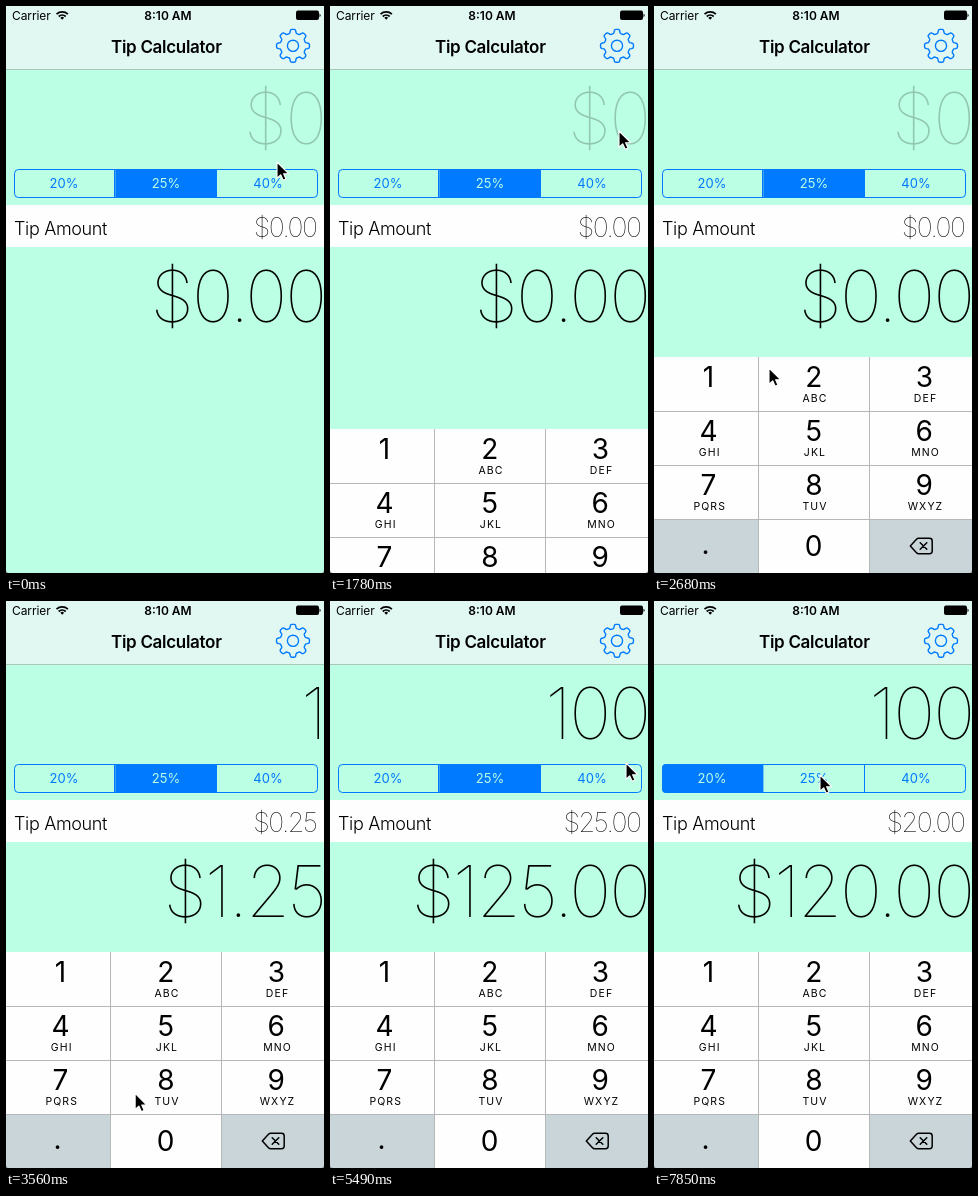
An HTML page that plays this animation: 318x567 px, repeating every 7990 ms.

```html
<!DOCTYPE html>
<html lang="en">
<head>
<meta charset="utf-8">
<title>Tip Calculator</title>
<style>
  html, body { margin: 0; width: 100%; height: 100%; overflow: hidden; background: #bbffe4; }
  svg { display: block; width: 100%; height: 100%; }
  text { font-family: Inter, Roboto, sans-serif; }
  .mid { text-anchor: middle; }
  .end { text-anchor: end; }
  .big { font-size: 71px; font-weight: 100; letter-spacing: -2.1px; }
  .line { fill: none; stroke: #007aff; }
  .seg { font-size: 13px; }
  .digit { font-size: 28px; }
  .letters { font-size: 10.5px; letter-spacing: 1.1px; }
</style>
</head>
<body>
<svg viewBox="0 0 318 567">
  <clipPath id="segmentClip"><rect x="8" y="163" width="304" height="29" rx="4"/></clipPath>

  <rect width="318" height="567" fill="#bbffe4"/>
  <rect width="318" height="63" fill="#e1f8f2"/>
  <rect y="63" width="318" height="1" fill="#a9c5bc"/>

  <text x="6" y="13.5" font-size="12" letter-spacing="-.1">Carrier</text>
  <g fill="none" stroke="#000" stroke-width="1.7">
    <path d="M50.5 8.2a8.4 8.4 0 0 1 11.4 0M52.7 10.5a5.2 5.2 0 0 1 7 0"/>
    <path d="M54.3 11.7a2.8 2.8 0 0 1 3.8 0L56.2 13.8Z" fill="#000" stroke="none"/>
  </g>
  <text class="mid" x="162" y="13.5" font-size="12" font-weight="600">8:10 AM</text>
  <rect x="290" y="4.5" width="23" height="9.5" rx="2"/>
  <path d="M313.5 7.4q2.4 1.9 0 3.8Z"/>

  <text class="mid" x="160.3" y="47.2" font-size="17" font-weight="600" letter-spacing="-.3">Tip Calculator</text>
  <path id="gear" class="line" stroke-width="1.4" stroke-linejoin="round"/>
  <circle class="line" cx="287" cy="39.8" r="5.6" stroke-width="1.4"/>

  <text id="bill" class="big end" x="319" y="138"/>

  <g id="segments" clip-path="url(#segmentClip)"></g>
  <path class="line" d="M108.5 163v29M210.5 163v29"/>
  <rect class="line" x="8.5" y="163.5" width="303" height="28" rx="4"/>
  <g id="segmentLabels"></g>

  <rect y="199" width="318" height="42" fill="#fefefe"/>
  <text x="8" y="228.5" font-size="18" font-weight="300" letter-spacing="-.35">Tip Amount</text>
  <text id="tip" class="end" x="310.5" y="231" font-size="27" font-weight="100" letter-spacing="-1.5"/>
  <text id="total" class="big end" x="319" y="315.5"/>

  <g id="keyboard">
    <rect y="351" width="318" height="216" fill="#fefefe"/>
    <path d="M0 513h104v54H0zM216 513h102v54H216z" fill="#cad5da"/>
    <rect id="pressed" x="105" y="513" width="110" height="54" fill="#cad5da"/>
    <path d="M104.5 351v216M215.5 351v216M0 405.5h318M0 459.5h318M0 513.5h318" stroke="#b4b8ba" fill="none"/>
    <g id="keys"></g>
    <g fill="none" stroke="#000" stroke-width="1.5" stroke-linejoin="round" stroke-linecap="round">
      <path d="M256.3 540l6.2-6.8q.9-1 2.2-1h10.8q2.7 0 2.7 2.7v10.2q0 2.7-2.7 2.7h-10.8q-1.3 0-2.2-1z"/>
      <path d="M266.2 536.7l6.6 6.6M272.8 536.7l-6.6 6.6"/>
    </g>
  </g>

  <path d="M0 564q0 3 3 3H0zM318 564q0 3-3 3h3z" fill="#777"/>
  <path id="cursor" d="M0 0V16.2L3.7 12.8L6.2 18.3L9 17.1L6.6 11.7H11.6Z" stroke="#fff" stroke-width="1.1" stroke-linejoin="round"/>
</svg>
<script>
const LOOP = 7990, FRAMES = 54, FRAME = LOOP / FRAMES;
const MINT = '#bbffe4', BLUE = '#007aff';
const $ = id => document.getElementById(id);

function add(parent, tag, attrs, content = '') {
  const el = document.createElementNS('http://www.w3.org/2000/svg', tag);
  for (const name in attrs) el.setAttribute(name, attrs[name]);
  el.textContent = content;
  return $(parent).appendChild(el);
}

// A circle whose radius follows a flattened cosine, giving rounded teeth.
function gearPath(cx, cy, teeth) {
  const points = Array.from({ length: 160 }, (_, i) => {
    const a = i / 160 * 2 * Math.PI;
    const r = 14.6 + 1.9 * Math.tanh(2.5 * Math.cos(teeth * a));
    return `${cx + r * Math.sin(a)} ${cy - r * Math.cos(a)}`;
  });
  return `M${points.join('L')}Z`;
}
$('gear').setAttribute('d', gearPath(287, 39.8, 8));

const rates = [20, 25, 40];
const segments = rates.map((_, i) =>
  add('segments', 'rect', { x: 8 + 101.3 * i, y: 163, width: 101.4, height: 29, fill: BLUE }));
const labels = rates.map((rate, i) =>
  add('segmentLabels', 'text', { class: 'seg mid', x: 58 + 102 * i, y: 182 }, rate + '%'));

const columns = [54.5, 159.8, 270.3];
['', 'ABC', 'DEF', 'GHI', 'JKL', 'MNO', 'PQRS', 'TUV', 'WXYZ'].forEach((letters, i) => {
  const x = columns[i % 3], y = 381 + 54 * Math.floor(i / 3);
  add('keys', 'text', { class: 'digit mid', x, y }, i + 1);
  add('keys', 'text', { class: 'letters mid', x: x + 1.2, y: y + 15 }, letters);
});
add('keys', 'text', { class: 'digit mid', x: 159.5, y: 550 }, '0');
add('keys', 'text', { class: 'digit mid', x: 51.5, y: 548 }, '.');

const typedAt = [22, 28, 30], pressAt = 27, switchAt = 45;

// Places the pointer visits: arrival, departure, x, y.
const stops = [
  [0, 0, 271, 156], [3.5, 3.5, 196, 309], [6, 6, 254, 133], [9, 13, 289, 125],
  [18, 18, 115, 362], [21, 22, 41, 376], [25, 32, 160, 533], [34, 34, 277, 115],
  [37, 37, 296, 162], [42, 50, 55, 178], [53, 54, 166, 174]
];

function pointer(tick) {
  const i = stops.findLastIndex(([arrive]) => arrive <= tick);
  const [, leave, x, y] = stops[i];
  if (tick <= leave || i === stops.length - 1) return [x, y];
  const [arrive, , nextX, nextY] = stops[i + 1];
  const p = (tick - leave) / (arrive - leave);
  const eased = p * p * (3 - 2 * p);
  return [x + (nextX - x) * eased, y + (nextY - y) * eased];
}

// Critically damped spring.
function keyboardDrop(seconds) {
  const u = Math.max(0, 11.7 * (seconds - 1.58));
  return Math.round(216 * (1 + u) * Math.exp(-u));
}

const dollars = n => '$' + n.toFixed(2);

function draw(t) {
  const tick = Math.floor(t / FRAME);
  const typed = '100'.slice(0, typedAt.filter(when => when <= tick).length);
  const rate = tick < switchAt ? 25 : 20;
  const bill = Number(typed), tip = bill * rate / 100;

  $('cursor').setAttribute('transform', `translate(${pointer(tick)})`);
  $('keyboard').setAttribute('transform', `translate(0 ${keyboardDrop(tick * FRAME / 1000)})`);
  $('pressed').style.opacity = tick === pressAt ? 1 : 0;
  $('bill').textContent = typed || '$0';
  $('bill').style.opacity = typed ? 1 : .22;
  $('tip').textContent = dollars(tip);
  $('total').textContent = dollars(bill + tip);
  rates.forEach((value, i) => {
    const on = value === rate;
    segments[i].style.opacity = on ? 1 : 0;
    labels[i].style.fill = on ? MINT : BLUE;
  });
}

const start = performance.now();
function animate() {
  draw((performance.now() - start) % LOOP);
  requestAnimationFrame(animate);
}
animate();
</script>
</body>
</html>
```
